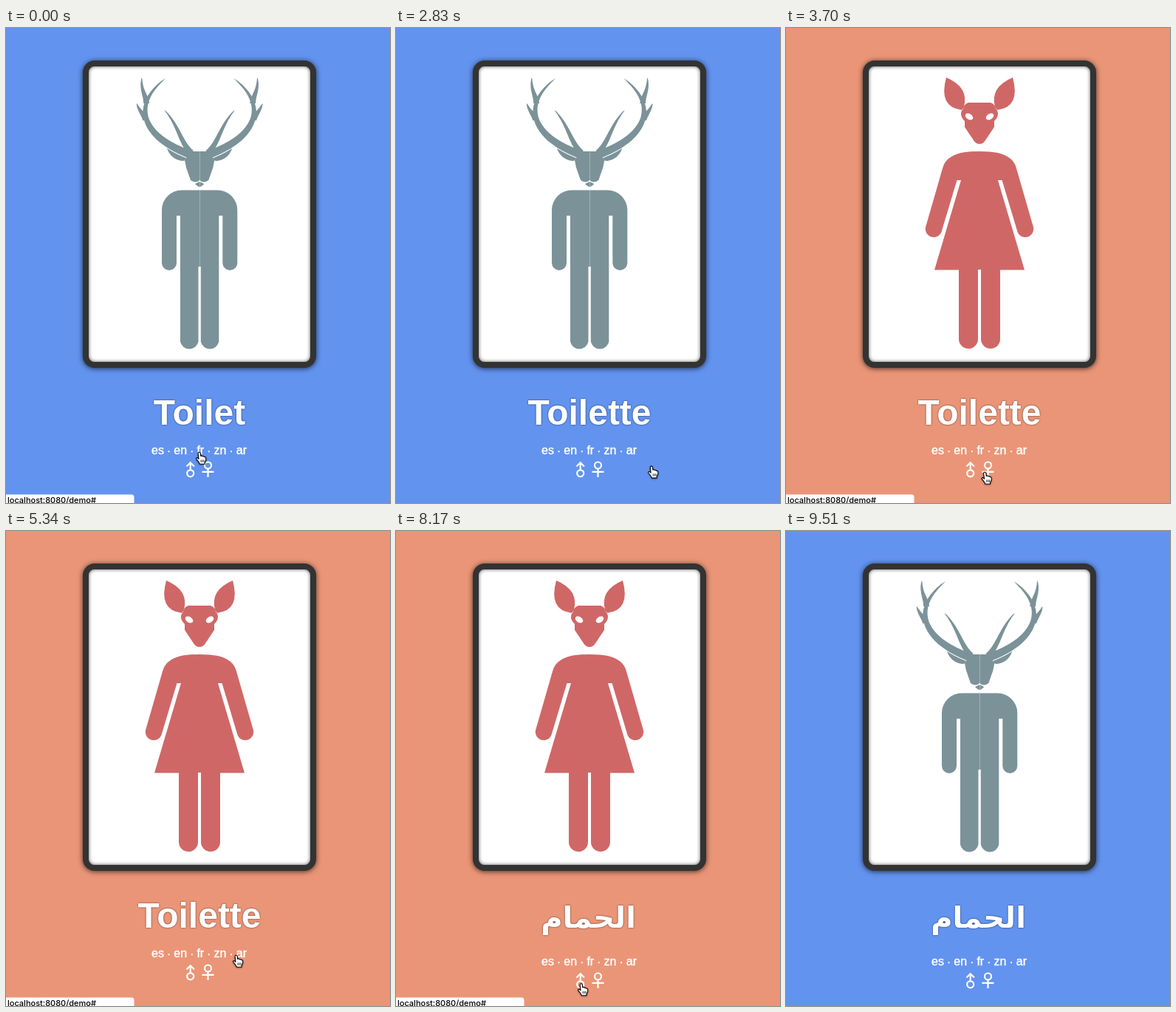
These frames come from a looping animation (520 px wide and 643 px high, 9900 ms). An HTML page:

```html
<!DOCTYPE html>
<html lang="en">
<head>
<meta charset="utf-8">
<title>Toilet sign</title>
<style>
  html, body { margin: 0; width: 100%; height: 100%; overflow: hidden; }
  body { position: relative; background: #6293ef; }
  #sign {
    position: absolute; left: 104px; top: 44px; width: 300px; height: 400px;
    border: 8px solid #333; border-radius: 16px; background: #fff;
    box-shadow: 0 1px 7px rgba(0,0,0,.7), inset 0 0 5px rgba(0,0,0,.65);
  }
  svg { position: absolute; left: 0; top: 0; display: block; }
  #title {
    font: bold 48px "Liberation Sans", Arial, sans-serif; fill: #fff; text-anchor: middle;
    filter: drop-shadow(0 0 1px rgba(0,0,0,.6));
  }
  #title:lang(zh) { font-family: "Noto Sans CJK TC", "Noto Sans CJK JP", "Noto Sans CJK", sans-serif; }
  #title:lang(ar) { font-family: "DejaVu Sans", sans-serif; font-size: 40px; }
  #links {
    font: 16px "Liberation Sans", Arial, sans-serif; text-anchor: middle; white-space: pre;
    fill: #fff; stroke: #fff; stroke-width: .4;
  }
  #links tspan { font-size: 15px; }
  #icons { fill: none; stroke: #fff; stroke-width: 2.2; }
  #status text { font: 500 11px Inter, Roboto, sans-serif; fill: #000; }
  #stag { fill: #7b9299; }
  #antler { stroke: #fff; stroke-width: 2; paint-order: stroke; }
  #doe { fill: #d06767; }
</style>
</head>
<body>
<div id="sign"></div>
<svg width="520" height="643" viewBox="0 0 520 643">
  <g id="stag">
    <g id="stagHalf">
      <path d="M217 160Q234 158 245 170Q245 180 239 180Q222 178 217 160Z"/>
      <path id="antler"/>
      <path d="M262 167H246Q246 175 242 179L244 189L250 206Q257 211 262 206Z"/>
      <path d="M262 208L256 211Q260 215 262 215Z"/>
      <path d="M262 219.500H238A27 27 0 0 0 211 246V318a10 10 0 0 0 20 0V254H236V424.500a12.500 12.500 0 0 0 24.500 0V323H262Z"/>
    </g>
    <use href="#stagHalf" transform="matrix(-1 0 0 1 524.300 0)"/>
  </g>
  <g id="doe">
    <g id="doeHalf">
      <path d="M217 67Q248 80 241 107L238 111Q206 107 217 67Z"/>
      <path d="M262 101H247Q241 103 240 109Q233 117 242 126V134L254 152Q257 157 262 157Z"/>
      <ellipse cx="248" cy="120" rx="5.800" ry="3.800" transform="rotate(32 248 120)" fill="#fff"/>
      <path d="M262 167Q247 167 237 169Q216 174 212 190L189.500 268A11 11 0 0 0 210.500 276L231.500 206H237L201 327.500H234V421a13 13 0 0 0 26 0V327H262Z"/>
    </g>
    <use href="#doeHalf" transform="matrix(-1 0 0 1 524 0)"/>
  </g>
  <text id="title"></text>
  <g id="menu">
    <text id="links" x="261.5" y="577"></text>
    <path id="icons" d="M249.700 598V588.500M244.500 593.500L249.700 588.300L254.900 593.500M254.200 602.800a4.500 4.500 0 1 1-9 0a4.500 4.500 0 1 1 9 0M278 592a4.500 4.500 0 1 1-9 0a4.500 4.500 0 1 1 9 0M273.500 596.500V608M265.500 600.800H281.500"/>
  </g>
  <g id="status">
    <path d="M-1 644V631.500H170Q173.500 631.500 173.500 635V644Z" fill="#fff"/>
    <text x="2" y="643">localhost:8080/demo#</text>
  </g>
  <g id="hand" stroke="#000">
    <path d="M3.600 2.600C3.600 .2 6.600 .2 6.900 2.600L7.300 6Q9.200 4.800 9.700 6.400Q11.500 5.700 12 7.200Q14.200 6.800 14.200 8.800V11.500L12.600 15V16.800H5.800Q5.500 15 1.400 10.200C.4 8.800 2 7.600 3.200 8.600L4.500 9.800Z" fill="#fff" stroke-width="1.100" stroke-linejoin="round" style="filter:drop-shadow(0 1px 1px rgba(0,0,0,.35))"/>
    <path d="M7.600 11v3.300m2-3.300v3.300m1.900-3.300v3.300" stroke-width=".8"/>
  </g>
</svg>
<script>
const LOOP = 9900, STEP = 147;
const el = id => document.getElementById(id);
const clamp = v => Math.min(1, Math.max(0, v));
const ramp = (t, from, to) => clamp((t - from) / (to - from));
const smooth = p => p * p * (3 - 2 * p);

// A horn follows a cubic curve and thins out towards its tip.
function horn(width, ...curve) {
  const along = (t, axis) => [1, 3, 3, 1].reduce((sum, k, i) =>
    sum + k * (1 - t) ** (3 - i) * t ** i * curve[i][axis], 0);
  const left = [], right = [];
  for (let t = 0; t < 1; t += .04) {
    const x = along(t, 0), y = along(t, 1);
    const dx = along(t + .01, 0) - x, dy = along(t + .01, 1) - y;
    const r = width / 2 * (1 - t) ** .6 / Math.hypot(dx, dy);
    left.push([x - dy * r, y + dx * r]);
    right.unshift([x + dy * r, y - dx * r]);
  }
  return 'M' + [...left, curve[3], ...right].map(p => p.map(v => v.toFixed(1))).join('L') + 'Z';
}
el('antler').setAttribute('d', [
  horn(11, [249, 171], [190, 150], [165, 108], [216, 68]),
  horn(8, [251, 169], [236, 155], [234, 132], [214.5, 111]),
  horn(8, [190, 102], [190, 92], [182, 84], [184, 67]),
  horn(8, [189, 124], [186, 116], [180, 112], [177, 102])
].join(''));

el('links').innerHTML = ['es', 'en', 'fr', 'zn', 'ar'].join('<tspan> · </tspan>');

const TITLES = [
  { at: 0, lang: 'en', text: 'Toilet', y: 536.5 },
  { at: 1800, lang: 'fr', text: 'Toilette', y: 536.5 },
  { at: 5780, lang: 'zh', text: '廁所', y: 545 },
  { at: 7120, lang: 'ar', text: 'الحمام', y: 537 }
];

// Each move glides to a point in a few held steps; bend swings it sideways on the way.
const START = { x: 256.5, y: 573.5 };
const MOVES = [
  { at: 150, steps: 1, x: 259, y: 573.5 },
  { at: 2240, steps: 8, x: 268, y: 601, bend: 90 },
  { at: 3410, steps: 2, x: 264, y: 600.5 },
  { at: 4150, steps: 4, x: 312, y: 573.5 },
  { at: 5340, steps: 3, x: 290.5, y: 573.5 },
  { at: 6230, steps: 3, x: 312, y: 582.5 },
  { at: 7270, steps: 5, x: 243, y: 612 },
  { at: 8170, steps: 1, x: 245.5, y: 612 },
  { at: 9060, steps: 4, x: 345, y: 660 }
];

function pointer(t) {
  return MOVES.filter(m => t >= m.at).reduce((from, { at, steps, x, y, bend = 0 }) => {
    const p = smooth(clamp((Math.floor((t - at) / STEP) + 1) / steps));
    return {
      x: from.x + (x - from.x) * p + bend * Math.sin(Math.PI * p),
      y: from.y + (y - from.y) * p
    };
  }, START);
}

function render(t) {
  const title = TITLES.findLast(entry => t >= entry.at);
  const female = t >= 3700 && t < 8620;
  const heading = el('title'), hand = pointer(t);
  if (heading.textContent !== title.text) {
    heading.textContent = title.text;
    heading.setAttribute('lang', title.lang);
    heading.setAttribute('x', title.lang === 'ar' ? 260.5 : 262);
    heading.setAttribute('y', title.y);
  }
  el('menu').setAttribute('transform', `translate(0 ${t >= 5780 ? 11 : 0})`);
  document.body.style.background = female ? '#ea9577' : '#6293ef';
  el('stag').style.display = female ? 'none' : '';
  el('doe').style.display = female ? '' : 'none';
  el('status').style.opacity = 1 - ramp(t, 2390, 2680) + ramp(t, 3270, 3580) - ramp(t, 9210, 9510);
  el('hand').setAttribute('transform', `translate(${hand.x} ${hand.y})`);
}

const begin = performance.now();
function tick() {
  render((performance.now() - begin) % LOOP);
  requestAnimationFrame(tick);
}
tick();
</script>
</body>
</html>
```
